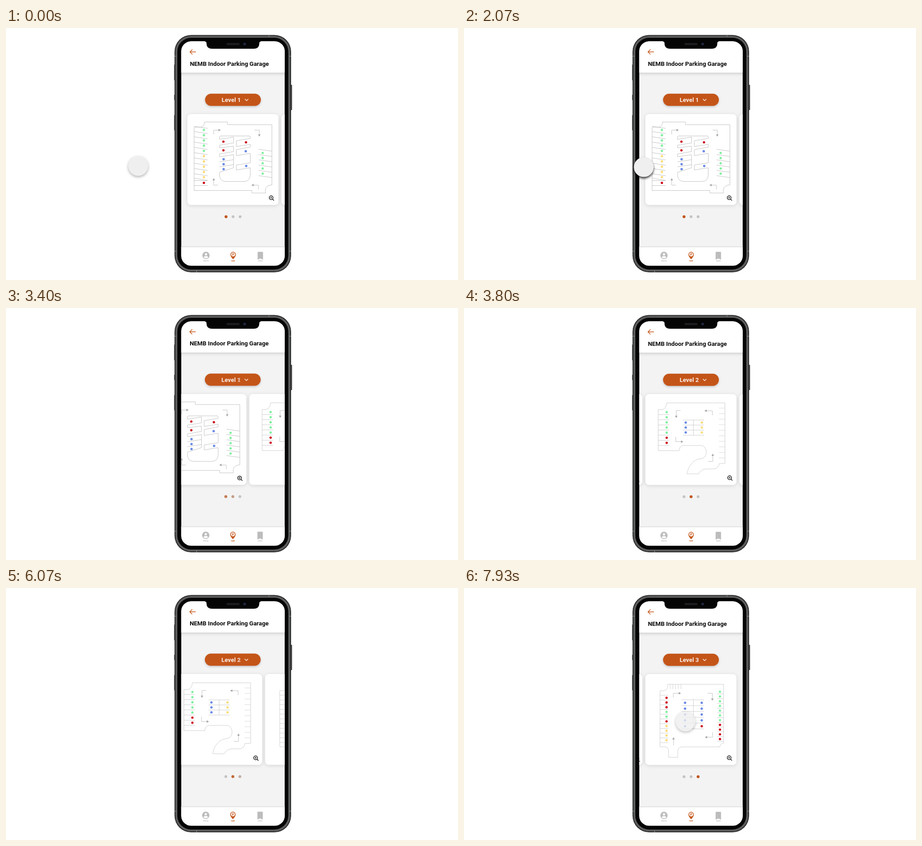
Write an HTML page with a canvas that moves like this. It is 1002 px wide and 559 px high and loops after 8000 ms.

```html
<!DOCTYPE html>
<html lang="en">
<head>
<meta charset="utf-8">
<title>Parking levels</title>
<style>
html, body { margin: 0; width: 100%; height: 100%; overflow: hidden; background: #fff; }
canvas { display: block; }
</style>
</head>
<body>
<canvas id="stage" width="1002" height="559"></canvas>
<script>
const ctx = document.getElementById('stage').getContext('2d');
const LOOP = 8000, PITCH = 208.5, SLIDE = 300, SLIDES = [3334.5, 6039];
const ORANGE = '#c45518', GREY = '#c3c3c3';
const COLORS = { g: '#82efa0', y: '#f9dc78', r: '#cc0a1c', b: '#5c7fe3' };
const FONT = 'Roboto, "Liberation Sans", sans-serif';

const clamp = v => Math.max(0, Math.min(1, v));
const mix = (a, b, k) => a + (b - a) * k;
const ramp = (t, a, b) => clamp((t - a) / (b - a));
const smooth = k => (1 - Math.cos(Math.PI * k)) / 2;

// cubic-bezier(0, 0, .58, 1)
function easeOut(x) {
  if (x <= 0 || x >= 1) return clamp(x);
  let lo = 0, hi = 1;
  for (let i = 0; i < 24; i++) {
    const s = (lo + hi) / 2;
    if (1.74 * (1 - s) * s * s + s * s * s < x) lo = s; else hi = s;
  }
  return 3 * (1 - lo) * lo * lo + lo * lo * lo;
}

function fillBox(x, y, w, h, r, color) {
  ctx.beginPath();
  ctx.roundRect(x, y, w, h, r);
  ctx.fillStyle = color;
  ctx.fill();
}

function disc(x, y, r, color) {
  ctx.beginPath();
  ctx.arc(x, y, r, 0, 7);
  ctx.fillStyle = color;
  ctx.fill();
}

function stroke(d, color, width = 1) {
  ctx.strokeStyle = color;
  ctx.lineWidth = width;
  ctx.stroke(new Path2D(d));
}

function fillPath(d, color) {
  ctx.fillStyle = color;
  ctx.fill(new Path2D(d));
}

function shadow(color, blur, dy) {
  ctx.shadowColor = color;
  ctx.shadowBlur = blur;
  ctx.shadowOffsetY = dy;
}
const noShadow = () => shadow('transparent', 0, 0);

function text(s, x, y, size, color, weight = 700, align = 'left') {
  ctx.font = `${weight} ${size}px ${FONT}`;
  ctx.textAlign = align;
  ctx.fillStyle = color;
  ctx.fillText(s, x, y);
}

// n parallel lines, each rising or falling by dy
function rows(n, x1, x2, y, step, dy = 0) {
  let d = '';
  for (let i = 0; i < n; i++) d += `M${x1} ${y + i * step}L${x2} ${y + i * step + dy}`;
  return d;
}

function dots(x, y, step, codes) {
  [...codes].forEach((c, i) => {
    disc(x, y + i * step, 2.6, COLORS[c]);
    if (c === 'b') disc(x, y + i * step, 0.8, '#a9bdf2');
  });
}

// L-shaped arrow: start, corner, tip
function arrow(x0, y0, x1, y1, x2, y2) {
  stroke(`M${x0} ${y0}L${x1} ${y1}L${x2} ${y2}`, GREY);
  const a = Math.atan2(y2 - y1, x2 - x1);
  ctx.save();
  ctx.translate(x2, y2);
  ctx.rotate(a);
  fillPath('M1 0L-4 -2.7V2.7Z', '#a5a5a5');
  ctx.restore();
}

function levelOne() {
  const line = '#c2c2c2';
  stroke('M417 220V360.5H545V366H575V358Q577 349 589.5 348V214.5H491V208.5H440Q440 219 432 220Z', line);
  stroke(rows(10, 417, 447, 218, 11.7, 4.5) + 'M417 333L447 338M417 338.5H447M417 349.5H447', line);
  stroke('M476 239.5H539Q541.5 239.5 541.5 242V245L510.5 250V263L541.5 258V264L510.5 270' +
    'V283L541.5 278V299L510.5 304V315L541.5 310V327Q540 340 528 340.5H487Q475 340 473.5 328' +
    'V320L504.5 310V281L473.5 285.5V279.5L504.5 274V262L473.5 266V260L504.5 255V242L473.5 247V242Q473.5 239.5 476 239.5', line);
  stroke(rows(2, 473, 505, 297, 11, -5), line);
  stroke(rows(6, 560, 589, 269, 11.7, 4.2), line);
  dots(438.7, 226, 11.65, 'gggggyyyyy');
  dots(438.7, 343.5, 0, 'r');
  dots(482, 252, 19.3, 'rr');
  dots(482.4, 291, 11, 'bbb');
  dots(532, 253.5, 0, 'r');
  dots(531.5, 273.3, 0, 'b');
  dots(532.5, 306, 0, 'b');
  dots(569, 277, 11.5, 'ggggg');
  arrow(460.5, 236, 460.5, 226.5, 475, 226.5);
  arrow(551, 226.5, 561.5, 226.5, 561.5, 240);
  arrow(470, 348.5, 460.5, 348.5, 460.5, 334);
  arrow(559.5, 358, 559.5, 348.5, 545, 348.5);
}

function levelTwo() {
  const line = '#cecece';
  stroke('M449 210.5H578.5V345H566Q564 357 552 357H536Q525 358 520 368H494.5C497 348 512 335 524 334.5' +
    'C543 333 540 305 525 305H484Q478 307 477 316.5H430.5V225.5H440Q449 222 449 210.5', line);
  stroke(rows(7, 430, 455, 236.5, 11.4), line);
  stroke(rows(10, 565, 578, 222, 12.3), '#dadada');
  stroke(rows(4, 485, 532, 248.5, 11.2) + 'M508.5 248V282', line);
  dots(449.3, 231, 11.35, 'gggggrr');
  dots(491.5, 254, 11, 'bbb');
  dots(527.2, 254, 11, 'yyy');
  arrow(480, 227.5, 470.5, 227.5, 470.5, 243);
  arrow(550.5, 238, 550.5, 228, 534, 228);
  arrow(541, 340.5, 551.5, 340.5, 551.5, 324);
  arrow(469.5, 286, 469.5, 296.5, 485, 296.5);
}

function levelThree() {
  const line = '#d0d0d0';
  stroke('M434.5 228H443Q451 227 451.5 219V213.5H575.5V344Q568 345 567 352.5H482Q475 353 474 361V375.5H453.5' +
    'V361Q453 353 446 352.5H434.5Z', line);
  for (let x = 457; x < 483; x += 6) stroke(`M${x} 213V224`, line);
  stroke(rows(11, 434, 453, 238, 10.5), line);
  stroke(rows(11, 561, 576, 235, 10.5), line);
  stroke(rows(6, 482, 532, 248, 12.9) + 'M508.5 246V313', line);
  dots(449, 243.5, 10.45, 'rrrggryyyy');
  dots(567.4, 230, 10.5, 'gggggggrrrr');
  dots(490, 254.5, 13, 'bbbbb');
  dots(527, 254.5, 13, 'bbbbr');
  arrow(464, 243, 464, 233.5, 480, 233.5);
  arrow(540, 233.5, 550.5, 233.5, 550.5, 249);
  arrow(551, 320, 551, 331, 535, 331);
  arrow(464.5, 349, 464.5, 342, 464.5, 332);
}

const LEVELS = [levelOne, levelTwo, levelThree];

function zoomIcon(x, y) {
  ctx.save();
  ctx.translate(x, y);
  stroke('M4.2 0A4.2 4.2 0 1 1 -4.2 0A4.2 4.2 0 1 1 4.2 0M3.2 3.2L6.2 6.2', '#161616', 1.5);
  stroke('M-2 0H2M0 -2V2', '#161616', 1.2);
  ctx.restore();
}

function cards(p) {
  LEVELS.forEach((draw, i) => {
    ctx.save();
    ctx.translate((i - p) * PITCH, 0);
    shadow('rgba(0,0,0,.13)', 9, 1.5);
    fillBox(402, 191, 202, 201.5, 8, '#fff');
    noShadow();
    draw();
    const drift = clamp(p - i);
    zoomIcon(587.8 + (i === 1 ? 1 : 0) + drift * 3.5, 376.5 + drift * 2.5);
    ctx.restore();
  });
}

function header() {
  shadow('rgba(0,0,0,.18)', 7, 2);
  fillBox(380, 20, 246, 79, 0, '#fff');
  noShadow();
  stroke('M421 53H408M413.3 47.5L407.8 53L413.3 58.5', ORANGE, 1.4);
  text('NEMB Indoor Parking Garage', 407.7, 83.7, 13.33, '#0c0c0c');
}

function levelButton(p) {
  shadow('rgba(0,0,0,.2)', 5, 2);
  fillBox(441.3, 145.8, 123.7, 26.9, 13.4, ORANGE);
  noShadow();
  text('Level ', 478, 164, 13.33, '#fbeee7');
  const x = 478 + ctx.measureText('Level ').width;
  for (let i = 0; i < 3; i++) {
    ctx.globalAlpha = clamp(1 - Math.abs(p - i));
    text(String(i + 1), x, 164, 13.33, '#fbeee7');
  }
  ctx.globalAlpha = 1;
  stroke('M529.6 157.5L533.4 161.2L537.2 157.5', '#fbeee7', 1.4);
}

function pager(p) {
  for (let i = 0; i < 3; i++) {
    disc(487.8 + i * 15.6, 418.6, 3.1, GREY);
    ctx.globalAlpha = clamp(1 - Math.abs(p - i));
    disc(487.8 + i * 15.6, 418.6, 3.2, ORANGE);
    ctx.globalAlpha = 1;
  }
}

function tabBar() {
  fillBox(380, 485, 246, 50, 0, '#fff');
  stroke('M380 485.5H626', '#cfcfcf', 1.2);
  disc(443.3, 504.4, 8.1, '#bcbcbc');
  disc(443.3, 502, 2.6, '#fff');
  fillPath('M438.2 509Q438.6 506 443.3 506T448.4 509Q443.3 513 438.2 509Z', '#fff');
  fillPath('M503.5 513C500 509 497.6 506.5 497.6 502.4A5.9 5.9 0 0 1 509.4 502.4C509.4 506.5 507 509 503.5 513Z', ORANGE);
  disc(503.5, 502.4, 4.4, '#fff');
  text('P', 503.7, 505.1, 7.5, ORANGE, 700, 'center');
  fillPath('M557.8 498Q557.8 496.6 559.2 496.6H568.4Q569.8 496.6 569.8 498V513.8L563.8 511.2L557.8 513.8Z', '#bcbcbc');
  text('PROFILE', 443.3, 518.2, 3.3, '#b5b5b5', 500, 'center');
  text('PARK', 503.5, 518.2, 3.3, ORANGE, 700, 'center');
  text('SAVED', 563.8, 518.2, 3.3, '#b5b5b5', 500, 'center');
}

// rounded layer of the casing, inset from its outer edge
function layer(inset, color) {
  fillBox(373.6 + inset, 15.5 + inset, 258.4 - 2 * inset, 526.5 - 2 * inset, 37 - inset, color);
}

function phoneBody() {
  const side = '#4a4a4a';
  fillBox(372.6, 81, 3, 35, 1, side);
  fillBox(372.6, 148, 3, 12, 1, side);
  fillBox(372.6, 193, 3, 34, 1, side);
  fillBox(630.5, 126, 3.7, 56, 1, side);
  layer(0, '#2a2a2a');
  layer(1.6, '#4c4e4d');
  layer(3.4, '#6a6c6b');
  layer(5.2, '#3a3b3a');
  layer(6.6, '#050505');
  stroke('M374 62.5H378M628 62.5H632M374 495H378M628 495H632M422.5 538V542M583 15.5V19', '#999');
}

function notch() {
  fillPath('M441 29H565V30Q561.5 30 561.5 34Q561.5 46 549 46H457Q444.5 46 444.5 34Q444.5 30 441 30Z', '#050505');
  fillBox(488.5, 33.3, 29.5, 4.6, 2.3, '#1c1c20');
  disc(529, 35.6, 3.2, '#1a1b30');
  disc(529, 35.6, 1.5, '#30345e');
}

// position, opacity and pressed depth of the touch marker
function touch(t) {
  if (t < 3300) {
    const k = smooth(ramp(t, 1600, 2740));
    return {
      x: mix(293, 582, k),
      y: mix(306, 293, k) + 8 * Math.sin(Math.PI * k),
      alpha: 1 - ramp(t, 2900, 3200),
      press: 0.75 * ramp(t, 1080, 1320) + 0.25 * ramp(t, 2400, 2800)
    };
  }
  if (t < 6000) {
    const k = smooth(ramp(t, 4800, 5400));
    return {
      x: mix(476, 580, k),
      y: mix(300, 301, k),
      alpha: ramp(t, 4590, 4750) * (1 - ramp(t, 5650, 5930)),
      press: ramp(t, 5380, 5550)
    };
  }
  return { x: 491, y: 296, alpha: ramp(t, 7790, 7970), press: 0 };
}

function marker(t) {
  const m = touch(t), r = 21.8;
  if (m.alpha <= 0) return;
  ctx.save();
  ctx.globalAlpha = m.alpha;
  // keep the shadow outside the disc so that it does not show through
  ctx.save();
  ctx.beginPath();
  ctx.rect(0, 0, 1002, 559);
  ctx.arc(m.x, m.y, r - 0.5, 0, 2 * Math.PI);
  ctx.clip('evenodd');
  shadow(`rgba(0,0,0,${mix(0.32, 0.95, m.press)})`, mix(6, 5, m.press), mix(2.5, 3.5, m.press));
  disc(m.x, m.y, r, '#efefef');
  ctx.restore();
  disc(m.x, m.y, r, '#efefef');
  ctx.restore();
}

function draw(t) {
  const p = SLIDES.reduce((sum, start) => sum + easeOut((t - start) / SLIDE), 0);
  const nudge = p % 1 ? -0.5 : 0;
  ctx.fillStyle = '#fff';
  ctx.fillRect(0, 0, 1002, 559);
  phoneBody();
  ctx.save();
  ctx.beginPath();
  ctx.roundRect(388.5, 29.5, 229.3, 497.8, 22);
  ctx.clip();
  fillBox(380, 20, 246, 520, 0, '#f3f3f3');
  ctx.translate(nudge, nudge / 2);
  cards(p);
  header();
  levelButton(p);
  pager(p);
  tabBar();
  ctx.restore();
  notch();
  marker(t);
}

function tick() {
  draw(performance.now() % LOOP);
  requestAnimationFrame(tick);
}
tick();
</script>
</body>
</html>
```
